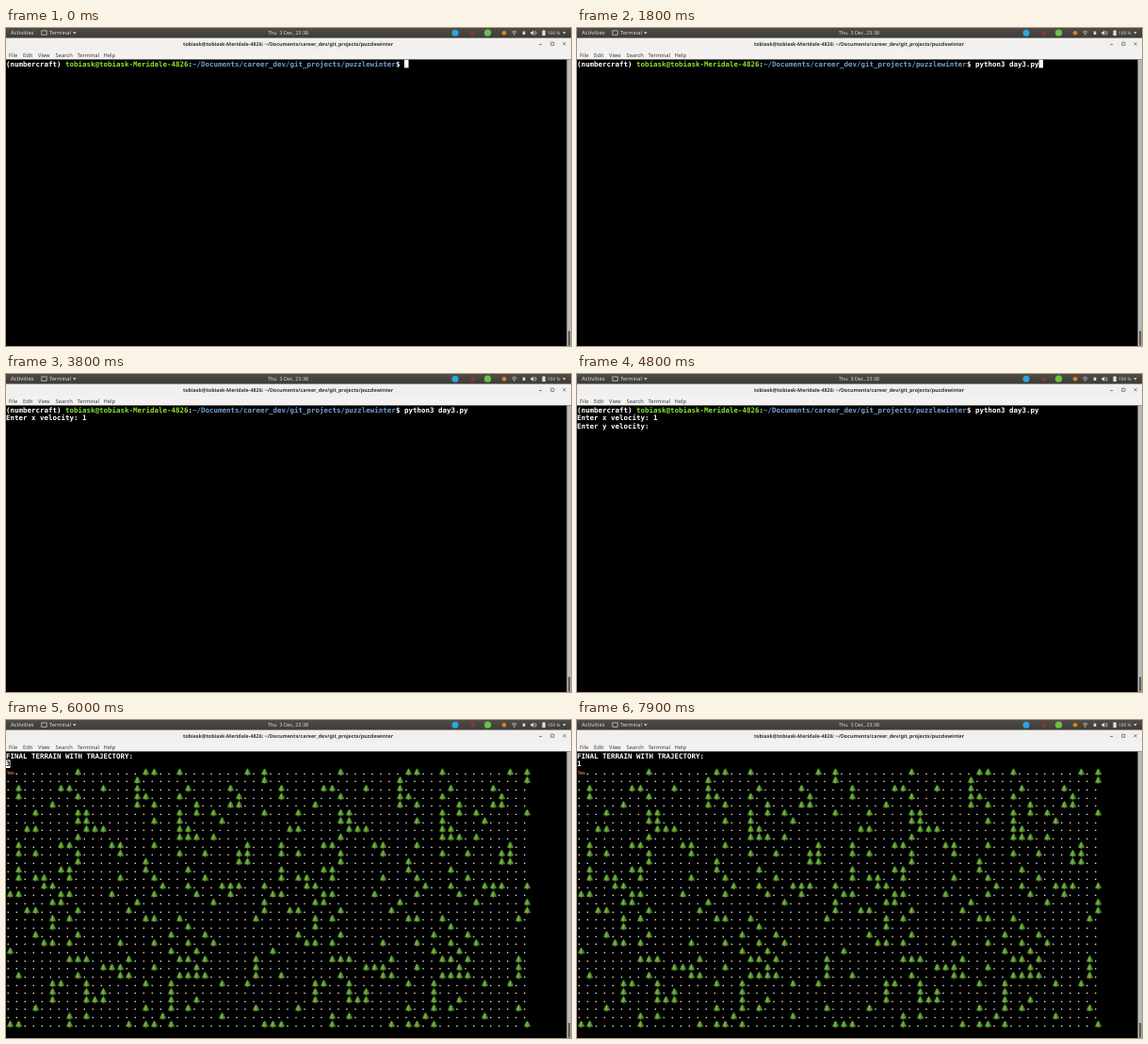
An HTML page with a canvas for the animation above (8 s loop, 600 by 338 pixels).

```html
<!DOCTYPE html>
<html lang="en">
<head>
<meta charset="utf-8">
<title>Terminal</title>
<style>
html, body { margin: 0; width: 100%; height: 100%; overflow: hidden; background: #000; }
canvas { display: block; }
</style>
</head>
<body>
<canvas id="stage" width="600" height="338"></canvas>
<script>
const ctx = document.getElementById('stage').getContext('2d');
ctx.textRendering = 'geometricPrecision';

const LOOP = 8000, CELL = 4.5, LINE = 8.645, TOP = 33.7;
const MONO = 'bold 7.475px "DejaVu Sans Mono", monospace';
const sans = (size, weight = 400) => `${weight} ${size}px "Noto Sans", "Open Sans", sans-serif`;
const USER = 'tobiask@tobiask-Meridale-4826';
const PATH = '~/Documents/career_dev/git_projects/puzzlewinter';
const PROMPT = [['(numbercraft) ', '#fff'], [USER, '#8ae234'], [':', '#fff'], [PATH, '#729fcf'], ['$ ', '#fff']];

// Terrain map: # is a tree; every row is padded to 31 cells and printed twice.
const terrain = `
........#.......##..#.......#.#
...............#..............#
.#....##...#...#.....#....#
.#......#......##...#......#
.....#.........#.#....#...##
...#....##..........#.#.#.....#
........##.......#..#....#
..##.....###........##
........#...........###.#
.#....##....##...#..........#
.#.#....#....#......#..#...##
........#.......#..........##
.#....##........#....#
.#.##..#.....#...#.....#
....##............#..#...###..#
##....##....#....#....#...#
.....##........#........#.....#
..##....#.....#...............#
.....#.#........##..#........#
.....#...............#
...#....#..........#...#
....##.#.....#...#...#..#
#..................#..#
.......###....#.....##.#.....#
...........###...#....#......#
.#......#....##.....####.....#
.....##..#......#..#.....#..#
.....#...#.#.......#
.....#...###.......#..#
...#............#..#.#.......#
.......#.#........#......#
##.....#......#.##.#..........#`.trim().split('\n').map(row => row.padEnd(31, '.').repeat(2));

const crown = new Path2D('M0-4.1 Q1-2.4 2.3-1.2 L1.8-.9 Q2.4.3 3.3 1 L2.8 1.3 Q3.2 2 3.9 2.5 Q0 3.8-3.9 2.5 Q-3.2 2-2.8 1.3 L-3.3 1 Q-2.4.3-1.8-.9 L-2.3-1.2 Q-1-2.4 0-4.1Z');
const shine = new Path2D('M0-3.4 Q.8-1.6.6 0 Q1.2 1.4.8 2.4 Q-1.2 2.8-2.6 2.1 L-1.4.4 L-2.1.4 L-.8-1.5Z');

function rect(color, x, y, w, h) {
  ctx.fillStyle = color;
  ctx.fillRect(x, y, w, h);
}

function disc(color, x, y, r) {
  ctx.fillStyle = color;
  ctx.beginPath();
  ctx.arc(x, y, r, 0, 7);
  ctx.fill();
}

function shape(color, d) {
  ctx.fillStyle = color;
  ctx.fill(new Path2D(d));
}

function stroke(color, width, d) {
  ctx.strokeStyle = color;
  ctx.lineWidth = width;
  ctx.stroke(new Path2D(d));
}

function label(str, x, y, font, color, align = 'left') {
  ctx.font = font;
  ctx.fillStyle = color;
  ctx.textAlign = align;
  ctx.fillText(str, x, y);
}

const print = (str, col, row, color = '#fff') =>
  label(str, col * CELL, TOP + row * LINE + 6.8, MONO, color);

const cursor = (col, row) => rect('#fff', col * CELL, TOP + row * LINE, CELL, LINE);

function topBar() {
  const shade = ctx.createLinearGradient(0, 0, 0, 10.5);
  shade.addColorStop(0, '#504c46');
  shade.addColorStop(1, '#3d3b37');
  rect(shade, 0, 0, 600, 10.5);
  const ink = '#dfdbd2';
  label('Activities', 5, 7.2, sans(5.9), ink);
  rect(ink, 37.5, 2.6, 6, 5);
  rect('#45423d', 38.2, 3.3, 4.6, 3.6);
  label('Terminal', 46, 7.2, sans(5.6), ink);
  shape(ink, 'M71 4.2 h3.6 l-1.8 2.2z');
  label('Thu  3 Dec, 23:38', 299.5, 7.2, sans(5.4), ink, 'center');
  disc('#2ca5e0', 477, 5.2, 3.5);
  disc('#8f3430', 496, 5.2, 2.5);
  disc('#6cc04a', 511.5, 5.2, 3.6);
  disc('#e8801e', 529, 5.2, 2.3);
  stroke(ink, .7, 'M537 4.4 Q539.7 2 542.4 4.4 M538.1 5.7 Q539.7 4.2 541.3 5.7');
  disc(ink, 539.7, 7, .7);
  rect(ink, 548.7, 3.6, 2.6, 3.4);
  shape(ink, 'M557 4.3 h1.4 l1.8-1.7 v5.4 l-1.8-1.7 h-1.4z');
  stroke(ink, .6, 'M561.2 3.7 q1.2 1.6 0 3.2 M562.3 2.9 q2 2.4 0 4.8');
  rect(ink, 569.4, 2.9, 3.4, 5.2);
  rect(ink, 570.3, 2.2, 1.6, .8);
  label('100 %', 575, 7, sans(4.8), ink);
  shape(ink, 'M591 4.2 h3.6 l-1.8 2.2z');
}

function windowBars() {
  rect('#f1f0ee', 0, 10.5, 600, 13.5);
  rect('#f3f2f1', 0, 24, 600, 9.4);
  label(`${USER}: ${PATH}`, 299.5, 19.1, sans(5.35, 700), '#333', 'center');
  stroke('#555', .7, 'M566 17.6 h3.2 M578.7 15.2 h3.2 v3.2 h-3.2z M591.4 15.2 l3.2 3.2 m0-3.2 l-3.2 3.2');
  const menu = { File: 3, Edit: 18, View: 34, Search: 52.5, Terminal: 75.5, Help: 103.5 };
  for (const name in menu) label(name, menu[name], 30.7, sans(5.75), '#3c3c3c');
}

function scrollBar() {
  rect('#b9b8b6', 595.5, 33.4, 4.5, 304.6);
  rect('#5a5957', 597, 322, 2.2, 15.5);
}

function tree(x, y) {
  ctx.save();
  ctx.translate(x, y);
  rect('#7a4a25', -.7, 2.6, 1.4, 1.5);
  ctx.fillStyle = '#47872a';
  ctx.fill(crown);
  ctx.fillStyle = '#74ad42';
  ctx.fill(shine);
  ctx.restore();
}

function sled() {
  shape('#b5522a', 'M1 54 H2.4 L3 55.2 H8 V56.4 H2z');
  stroke('#d07a3c', .7, 'M1.6 57.3 H7.8 Q9 57.1 8.8 55.8');
}

function drawTerrain(t) {
  print('FINAL TERRAIN WITH TRAJECTORY:', 0, 0);
  const count = t < 6900 ? '3' : t < 7900 ? '2' : '1';
  const lit = t < 6500 || (t >= 7100 && t < 7700);
  if (lit) cursor(0, 1);
  print(count, 0, 1, lit ? '#000' : '#fff');
  terrain.forEach((row, i) => {
    const cells = [...(i ? row : ' ' + row.slice(1))];
    print(cells.map(c => c === '.' ? '. ' : '  ').join(''), 0, i + 2);
    cells.forEach((c, k) => {
      if (c === '#') tree((k + .5) * 2 * CELL, TOP + (i + 2.5) * LINE);
    });
  });
  sled();
}

function drawShell(t) {
  let col = 0;
  for (const [str, color] of PROMPT) {
    print(str, col, 0, color);
    col += str.length;
  }
  const command = 'python3 day3.py', ask = axis => `Enter ${axis} velocity: `;
  if (t >= 1800) print(command, col, 0);
  if (t >= 2500) print(ask('x') + (t >= 3200 ? '1' : ''), 0, 1);
  if (t >= 3900) print(ask('y') + (t >= 5100 ? '1' : ''), 0, 2);

  if (t < 700 || (t >= 1300 && t < 1800)) cursor(col, 0);
  else if (t >= 1800 && t < 2400) cursor(col + command.length, 0);
  else if (t >= 2400 && t < 2500) cursor(0, 1);
  else if (t >= 2500 && t < 2900) cursor(18, 1);
  else if (t >= 3200 && t < 3800) cursor(19, 1);
  else if (t >= 3900 && t < 4600) cursor(18, 2);
  else if ((t >= 5100 && t < 5700) || t >= 5900) cursor(19, 2);
}

function frame(now) {
  const t = now % LOOP;
  rect('#000', 0, 0, 600, 338);
  topBar();
  windowBars();
  (t < 6000 ? drawShell : drawTerrain)(t);
  scrollBar();
  requestAnimationFrame(frame);
}

frame(0);
</script>
</body>
</html>
```
